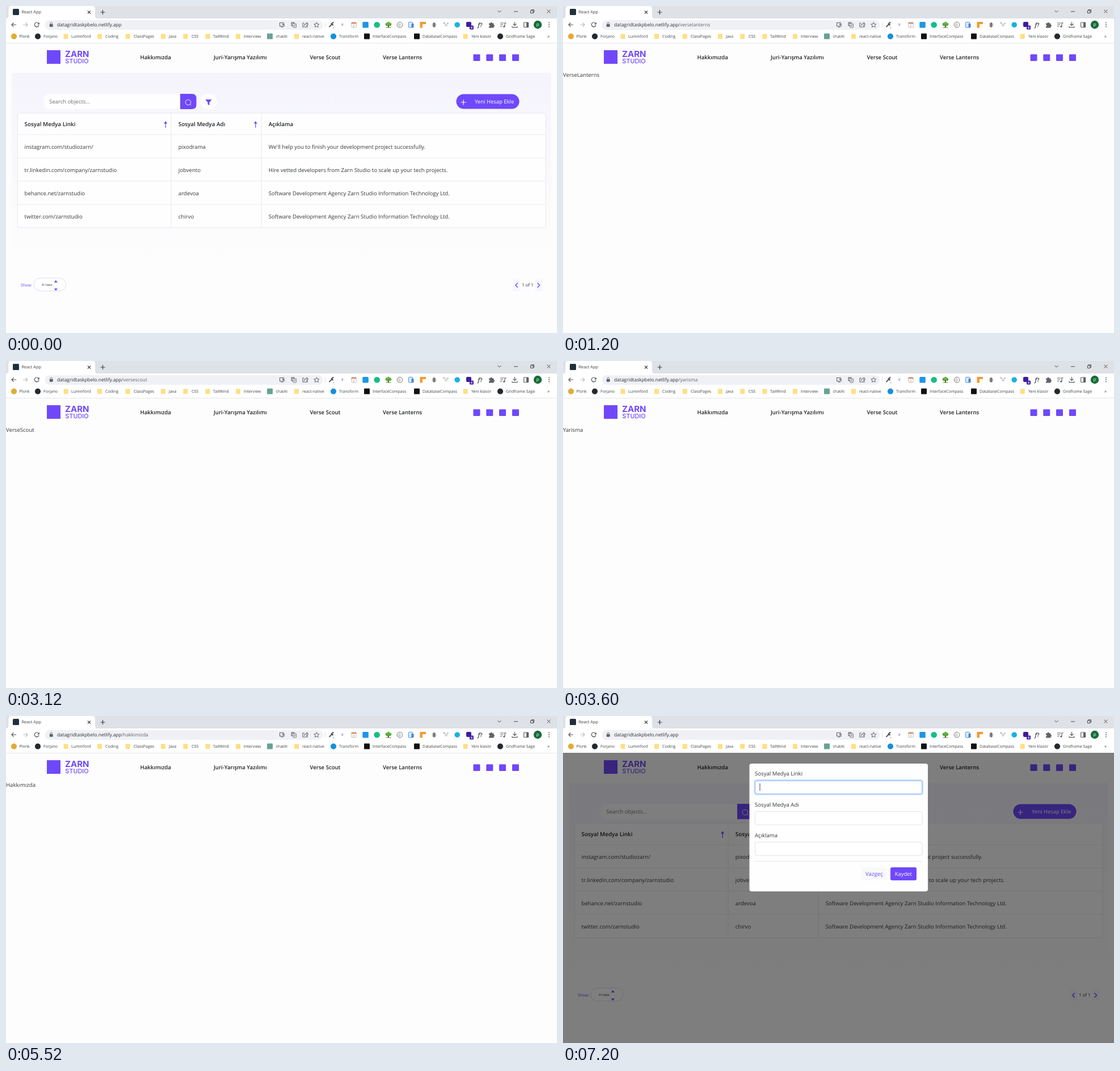
Write an HTML page that moves like this. It is 971 px wide and 577 px high and loops after 8000 ms.

```html
<!DOCTYPE html>
<html lang="tr">
<head>
<meta charset="utf-8">
<title>React App</title>
<style>
  html, body { margin: 0; width: 100%; height: 100%; overflow: hidden; background: #fdfdfd; }
  svg { display: block; width: 971px; height: 577px; font-family: "Open Sans", "Noto Sans", sans-serif; text-rendering: geometricPrecision; }
  .logo { font-family: Inter, sans-serif; }
</style>
</head>
<body>
<script>
const PURPLE = '#6f48fb', DARK = '#35393d', INK = '#1f2226', GREY = '#5f6368', LINE = '#e8e8ee';

// Drawing helpers; text is placed by the middle of its capitals.
const text = (x, y, s, size = 9.6, fill = DARK, weight = 400, extra = '') =>
  `<text x="${x}" y="${(y + size * 0.357).toFixed(2)}" font-size="${size}" fill="${fill}" font-weight="${weight}" ${extra}>${s}</text>`;
const rect = (x, y, w, h, fill, r = 0, extra = '') =>
  `<rect x="${x}" y="${y}" width="${w}" height="${h}" rx="${r}" fill="${fill}" ${extra}/>`;
const disc = (x, y, r, fill, extra = '') => `<circle cx="${x}" cy="${y}" r="${r}" fill="${fill}" ${extra}/>`;
const line = (d, stroke = GREY, w = 1.1, fill = 'none') =>
  `<path d="${d}" stroke="${stroke}" stroke-width="${w}" fill="${fill}" stroke-linejoin="round"/>`;
const fill = (d, color) => `<path d="${d}" fill="${color}"/>`;
const stroke = (color, w = 1) => `stroke="${color}" stroke-width="${w}"`;

function tabStrip() {
  return rect(0, 0, 971, 22, '#dee1e6') +
    fill('M0 22Q4.5 22 4.5 17V5Q4.5 0 9.5 0H152Q157 0 157 5V17Q157 22 161 22Z', '#fff') +
    rect(12, 5, 11, 11, '#20303c', 1.5) +
    text(27.5, 10.8, 'React App', 7.35, '#3c4043') +
    line('M144 8.5l5 5m0-5l-5 5', '#3c4043') +
    line('M166.5 11h8m-4-4v8', '#3c4043', 1.2) +
    line('M866.5 8l3 3 3-3M895 9.8h7', '#44474a', 1) +
    line('M924.5 8h4.5v4.5h-4.5zM926 8v-1.3h4.5v4.5h-1.3', '#44474a', 1) +
    line('M953.5 6.5l6 6m0-6l-6 6', '#44474a', 1);
}

function toolbar() {
  const arrow = (x, dir, color) => line(`M${x - 4 * dir} 33H${x + 4 * dir}m${-3.5 * dir} -3.6l${3.5 * dir} 3.6l${-3.5 * dir} 3.6`, color, 1.2);
  const browser = arrow(14, -1, '#4c5054') + arrow(34, 1, '#b9bcc0') +
    line('M57.3 30.5A3.9 3.9 0 1 0 58 33.8', '#4c5054', 1.2) + fill('M58.8 28.7v3.7h-3.7z', '#4c5054') +
    rect(68.5, 25, 490, 17, '#f0f1f6', 8.5) +
    rect(76.7, 32, 6, 4.8, GREY, .7) + line('M78 32v-1.2a1.7 1.7 0 0 1 3.4 0V32', GREY, .9);
  const page = line('M488 29.5h-5.5v6h8V34M484.5 37.3h4M488.8 28.5v5m-2-2l2 2 2-2') +
    rect(502.5, 28.5, 6, 7, '#777b80', .8) + rect(506, 31, 5.5, 7, '#f0f1f6', .8, stroke(GREY, .8)) +
    text(503.6, 32, 'G', 5, '#fff', 700) + line('M507.5 33.5h3m-1.5-1v1q0 2-1.5 3m.5-2l2 2', GREY, .6) +
    line('M525.5 30h-2.5v7h8v-2M525.5 35q.5-4 4.5-4v-2l2.5 3-2.5 3v-2') +
    line('M547.3 28.8l1.3 3 3.3.3-2.5 2.1.8 3.2-2.9-1.7-2.9 1.7.8-3.2-2.5-2.1 3.3-.3z', GREY, 1);
  const addons = line('M569.5 37l4.5-4.5', '#555', 1.8) + line('M573 30.5l3.5 3.5m-1.5-3.5l2-2', '#45494d', 2.2) + disc(577.5, 38.5, .8, '#777') +
    text(591, 33, 'II', 6, '#7b61d8', 600) +
    rect(608.7, 28.7, 8.6, 9, '#fff', 1, stroke('#b9aaa4', .8)) + rect(609, 29, 8, 2.5, '#e58b6d') + line('M611 34h4m-4 2h3', '#aaa', .7) +
    rect(628.3, 28, 10.5, 10.5, '#1e96e8', 1.5) + disc(653.7, 33.2, 5.3, '#15bf86') +
    rect(672.8, 33, 2.2, 5, '#76502d') + disc(671.5, 32.3, 2.8, '#57a83a') + disc(676.4, 32.3, 2.8, '#57a83a') + disc(674, 30.3, 2.6, '#63b944') + line('M669.5 38h9', '#4c8d36', 1) +
    disc(694, 33.2, 4.8, 'none', stroke('#666', .9)) + text(690.9, 33, '{}', 6, '#555') +
    rect(709.5, 28.5, 7, 9.5, '#dcecff', .8, stroke('#4087d6', .9)) + rect(714.5, 31, 4, 7, '#3e86dc', .7) +
    fill('M729.5 28h10.5v4h-6v6.5h-4.5z', '#f29a31') +
    line('M751 30.5l7 6m0-6l-7 6m-.5-3h8', '#777', .7) + rect(752.5, 29, 4, 8.7, '#77736e', 2) +
    disc(772, 30, 1.2, '#999') + disc(775.5, 33.5, 2.7, '#d9d9dc') + disc(778.5, 30.5, 1, '#888') +
    disc(795.2, 33.2, 4.8, '#19b1e3') +
    rect(811, 28, 9, 9, '#3d1d9c', 2) + rect(817, 34.5, 7, 7, '#4527a8', 1.3) + text(819, 38, '4', 5.2, '#fff', 700) +
    text(831.5, 33, '<tspan font-style="italic">f</tspan>?', 10, '#36393c', 600) +
    fill('M851 30.5h2.5a1.7 1.7 0 0 1 3.4 0h2.6v2.7a1.6 1.6 0 0 1 0 3.2V38.5H851v-2.4a1.6 1.6 0 0 0 0-3.2z', GREY) +
    line('M871 30h6.5M871 33h5m-5 3h3M879 36.3v-6.5h2.5', GREY, 1.2) + disc(877.7, 36.3, 1.5, GREY) +
    line('M896.5 28v6.5m-3-3l3 3 3-3M892 35.5v2.2h9v-2.2', GREY, 1.2) +
    rect(912.6, 29, 8, 8.5, '#fff', .8, stroke(GREY, 1.2)) + rect(917, 29, 4, 8.5, GREY) +
    disc(937, 33, 7.2, '#176d3a') + text(937, 32.5, 'p', 7.5, '#fff', 400, 'text-anchor="middle"') +
    [29.5, 33, 36.5].map(y => disc(957, y, 1, GREY)).join('');
  return rect(0, 22, 971, 43, '#fff') + browser + page + addons +
    line('M562.5 28v10', '#d5d8dc', .8);
}

function bookmarks() {
  const icons = {
    folder: x => rect(x - 4, 49.3, 8, 8.8, '#ffdf85', .9),
    dot: (x, c) => disc(x, 53.6, 5.1, c),
    box: (x, c) => rect(x - 5, 48.6, 10, 10, c, 1),
  };
  const items = [
    [14, 23.5, 'Plonk', 'dot', '#e2ac35'], [56, 66, 'Forjano', 'dot', '#24292e'],
    [105.5, 115, 'Luminford'], [165, 175, 'Coding'], [214.7, 225, 'ClassPages'], [277, 287, 'Java'],
    [316.3, 327, 'CSS'], [355.5, 365, 'TailWind'], [409, 419, 'Interview'],
    [465, 475.5, 'chatAI', 'box', '#68a394'], [512, 522, 'react-native'],
    [577, 587, 'Transform', 'dot', '#1690de'], [636, 646, 'InterfaceCompass', 'box', '#111'],
    [724, 734, 'DatabaseCompass', 'box', '#111'], [809.7, 820, 'Yeni klasör'],
    [871, 881, 'Gridframe Sage', 'dot', '#24292e'],
  ];
  return items.map(([ix, tx, name, kind = 'folder', c]) => icons[kind](ix, c) + text(tx, 53.7, name, 7.05, '#3c4043')).join('') +
    text(954, 53, '»', 8, '#3c4043') + rect(0, 65, 971, .8, '#e2e3e6');
}

function header() {
  const links = [[236.5, 'Hakkımızda'], [366, 'Juri-Yarışma Yazılımı'], [535.5, 'Verse Scout'], [664, 'Verse Lanterns']];
  return rect(72, 78, 24, 24, PURPLE) +
    text(104, 85, 'ZARN', 15, PURPLE, 700, 'class="logo"') +
    text(104.3, 97.3, 'STUDIO', 10.9, PURPLE, 500, 'class="logo"') +
    links.map(([x, s]) => text(x, 90.2, s, 9.6, INK, 600)).join('') +
    [829.5, 852.3, 875, 898].map(x => rect(x - 6, 85.2, 12, 11.8, PURPLE, 1.2)).join('');
}

function grid() {
  const rows = [
    ['instagram.com/studiozarn/', 'pixodrama', 'We\'ll help you to finish your development project successfully.'],
    ['tr.linkedin.com/company/zarnstudio', 'jobvento', 'Hire vetted developers from Zarn Studio to scale up your tech projects.'],
    ['behance.net/zarnstudio', 'ardevoa', 'Software Development Agency Zarn Studio Information Technology Ltd.'],
    ['twitter.com/zarnstudio', 'chirvo', 'Software Development Agency Zarn Studio Information Technology Ltd.'],
  ];
  const cols = [32.5, 303.8, 462.8];
  const sort = x => line(`M${x} 215v-10`, PURPLE, 1.2) + fill(`M${x - 3} 207.5l3-4.5 3 4.5z`, PURPLE);
  const search = rect(67, 155, 245, 27, '#fefefe', 9) + text(76.3, 169, 'Search objects...', 9.5, '#6d7176') +
    fill('M307 155h20.5q8 0 8 8v11q0 8-8 8H307z', PURPLE) +
    disc(321, 170, 4.8, 'none', stroke('#fff', .9)) + line('M324.5 173.5l2 2', '#fff', .9) +
    rect(342, 155.5, 30, 26.5, '#fefefe', 13) + fill('M351.3 165h11.4l-4.2 5v5.2l-3-1.8V170z', PURPLE);
  const add = rect(793.5, 155.5, 111, 26, PURPLE, 13) + line('M801.5 170h9m-4.5-4.5v9', '#fff', 1.2) +
    text(826, 169, 'Yeni Hesap Ekle', 9.5, '#fff');
  const table = rect(20.5, 189, 930.5, 202, '#fefefe', 1.5, stroke(LINE)) +
    line('M291 189v202M450 189v202M20.5 227H951M20.5 268H951M20.5 309H951M20.5 350H951', LINE, .9) +
    ['Sosyal Medya Linki', 'Sosyal Medya Adı', 'Açıklama'].map((s, i) => text(cols[i], 208.8, s, 9.9, INK, 600)).join('') +
    sort(281.2) + sort(439.8) +
    rows.map((row, r) => row.map((s, c) => text(cols[c], 248.2 + 41 * r, s)).join('')).join('');
  const pager = text(26, 492, 'Show:', 7.1, PURPLE) + rect(49, 480, 56.5, 23, '#fff', 11.5, stroke('#dfdbf8')) +
    text(63, 492, '4 rows', 6.1) + fill('M84.7 487.8l3.1-4 3.1 4zM84.7 498.6l3.1 4 3.1-4z', PURPLE) +
    rect(893.5, 482, 12.5, 21, '#f7f6fe', 2) + rect(932.5, 482, 12.5, 21, '#f7f6fe', 2) +
    line('M901.8 488.7l-4 4 4 4M936.5 488.7l4 4-4 4', PURPLE, 1.4) + text(909, 492.2, '1 of 1', 7.9);
  return `<linearGradient id="fade" x2="0" y2="1"><stop stop-color="#f5f4fd"/><stop offset=".82" stop-color="#fdfdfd"/></linearGradient>` +
    rect(10, 118, 950.5, 399, 'url(#fade)', 3) + search + add + table + pager;
}

function modal() {
  const field = (y, label) => text(338, y, label) + rect(338.5, y + 12.2, 294.5, 23.5, '#fff', 3.5, stroke('#dee2e6'));
  return rect(0, 65, 971, 512, '#000', 0, 'opacity=".5"') +
    rect(328.5, 84, 314.5, 225.5, '#fefefe', 4) +
    field(102, 'Sosyal Medya Linki') + field(156.3, 'Sosyal Medya Adı') + field(210.4, 'Açıklama') +
    rect(337.7, 113.3, 296, 25, '#fff', 4, stroke('#c2dbfe', 2.4)) + rect(338.7, 114.3, 294, 23, '#fff', 3.3, stroke('#86b7fe', .9)) +
    line('M347 119v13', '#333', .9) + line('M338 256.4h295', '#dee2e6', .9) +
    rect(526, 267, 45.5, 23, '#f8f9fa', 3) + text(533, 279, 'Vazgeç', 9.7, PURPLE) +
    rect(577, 267, 46, 23, PURPLE, 3) + text(584.7, 279, 'Kaydet', 9.4, '#fff', 500);
}

document.body.innerHTML = `<svg viewBox="0 0 971 577">${rect(0, 0, 971, 577, '#fdfdfd')}
  ${tabStrip()}${toolbar()}${bookmarks()}
  ${text(90, 33.2, 'datagridtaskpbelo.netlify.app<tspan id="path" fill="' + GREY + '"></tspan>', 8.35, '#2b2e32')}
  ${header()}${text(0, 122, '', 9.6, DARK, 400, 'id="note"')}
  <g id="grid">${grid()}</g><g id="modal">${modal()}</g></svg>`;

// start time, address path, page text, modal open
const LOOP = 8000;
const steps = [
  [0, '', ''],
  [1200, '/verselanterns', 'VerseLanterns'],
  [2400, '/versescout', 'VerseScout'],
  [3600, '/yarisma', 'Yarisma'],
  [4800, '/hakkimizda', 'Hakkımızda'],
  [6000, '', ''],
  [7200, '', '', true],
];
const [pathEl, noteEl, gridEl, modalEl] = ['path', 'note', 'grid', 'modal'].map(id => document.getElementById(id));
const show = (el, on) => { el.style.display = on ? '' : 'none'; };
let current;

function render(step) {
  const [, path, note, open] = step;
  pathEl.textContent = path;
  noteEl.textContent = note;
  show(gridEl, !note);
  show(modalEl, open);
}

function tick() {
  const t = performance.now() % LOOP;
  const step = steps.findLast(s => s[0] <= t);
  if (step !== current) render(current = step);
  requestAnimationFrame(tick);
}
tick();
</script>
</body>
</html>
```
